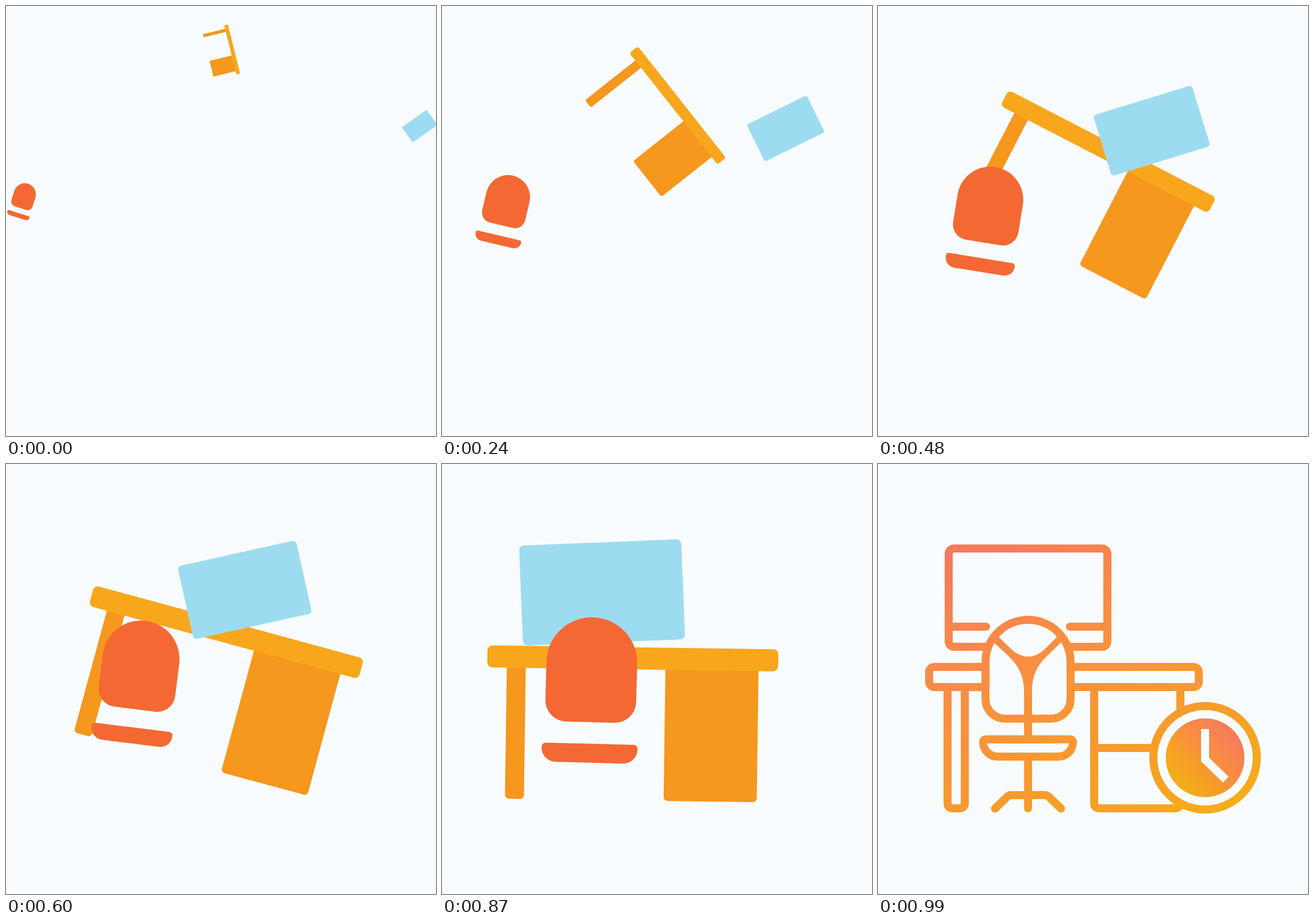
Write an HTML page that moves like this. It is 748 px wide and 748 px high and loops after 2890 ms.

```html
<!DOCTYPE html>
<html lang="en">
<head>
<meta charset="utf-8">
<title>Desk</title>
<style>
  html, body { margin: 0; width: 100%; height: 100%; overflow: hidden; background: #f8fcff; }
  svg { display: block; width: 100vw; height: 100vh; }
  .line { fill: none; stroke: url(#warm); stroke-width: 14; }
  .round { stroke-linecap: round; }
  .solid { fill: #f8fcff; }
  .hands { stroke: #f8fcff; }
</style>
</head>
<body>
<svg viewBox="0 0 748 748">
  <defs>
    <linearGradient id="warm" gradientUnits="userSpaceOnUse" x1="180" y1="100" x2="480" y2="680">
      <stop offset="0" stop-color="#f5785f"/>
      <stop offset=".36" stop-color="#fa8d44"/>
      <stop offset=".72" stop-color="#f79c2b"/>
      <stop offset="1" stop-color="#f5ae18"/>
    </linearGradient>
    <linearGradient id="dial" gradientUnits="userSpaceOnUse" x1="622" y1="462" x2="514" y2="562">
      <stop offset="0" stop-color="#f5795e"/>
      <stop offset=".4" stop-color="#f98d43"/>
      <stop offset=".7" stop-color="#f6a023"/>
      <stop offset="1" stop-color="#f2b117"/>
    </linearGradient>
  </defs>

  <g id="parts">
    <g id="desk">
      <g fill="#f6971e">
        <rect x="-219" y="-115" width="33" height="248.5" rx="7"/>
        <rect x="57" y="-115" width="162" height="248.5" rx="7"/>
      </g>
      <rect x="-253" y="-133" width="506" height="38.5" rx="9" fill="#f8a71d"/>
    </g>
    <rect id="screen" x="-149" y="-92" width="298" height="184" rx="9" fill="#9ddcf0"/>
    <g id="chair" fill="#f46933">
      <path d="M-79-47a79 79 0 0 1 158 0V19.500a37 37 0 0 1-37 37H-42a37 37 0 0 1-37-37z"/>
      <path d="M-75.500 94H75.500q8 0 8 8a25 25 0 0 1-25 25H-58.500a25 25 0 0 1-25-25q0-8 8-8z"/>
    </g>
  </g>

  <g id="icon" class="line">
    <rect x="123" y="147" width="276" height="171" rx="9"/>
    <path class="round" d="M125 283H188M334 283H397"/>
    <rect x="121" y="370" width="30" height="229" rx="8"/>
    <rect x="376" y="370" width="150" height="229" rx="8"/>
    <path d="M376 494H490"/>
    <rect class="solid" x="89" y="353" width="469" height="35" rx="9"/>
    <path class="solid" d="M187 345a74 74 0 0 1 148 0V409a34 34 0 0 1-34 34H221a34 34 0 0 1-34-34z"/>
    <path fill="url(#warm)" stroke="none" d="M200 304L210 301 235 325Q261 345 287 325L312 300 321 308 292 336C274 354 268 372 268 396V474H254V396C254 372 247 354 229 336L202 311z"/>
    <path d="M188 479H334q5 0 5 5a25 25 0 0 1-25 25H208a25 25 0 0 1-25-25q0-5 5-5z"/>
    <path class="round" d="M261 512V599M203.500 599.500L224 579.500Q227.500 576 232 576H290Q294.500 576 298 579.500L318.500 599.500"/>
    <circle class="solid" cx="569" cy="511" r="90"/>
    <circle cx="569" cy="511" r="68.500" fill="url(#dial)" stroke="none"/>
    <path class="hands" d="M569 461V514L605 549"/>
  </g>
</svg>
<script>
const LOOP = 2890, STEP = 30, REVEAL = 990;
const byId = id => document.getElementById(id);
const ramp = (t, from, to) => Math.min(1, Math.max(0, (t - from) / (to - from)));
const mix = (a, b, p) => a + (b - a) * p;
const show = (id, on) => byId(id).setAttribute("visibility", on ? "visible" : "hidden");

function place(id, x, y, scale, angle) {
  byId(id).setAttribute("transform", `translate(${x} ${y}) rotate(${angle}) scale(${scale})`);
}

// Grows while falling, drops onto its feet, then rocks back a little.
function moveDesk(t) {
  const grow = ramp(t, 0, 630), drop = ramp(t, 630, 750), rock = ramp(t, 750, 930);
  place("desk",
    374.2 - 20.5 * grow - 24.7 * drop + 2 * rock,
    80.4 + 333.5 * grow + 40.6 * drop - 4 * rock,
    mix(0.174, 1, grow),
    mix(76, 0, ramp(t, 0, 750)) + 1.2 * rock);
}

function moveScreen(t) {
  const p = ramp(t, 0, 930);
  place("screen", mix(719.5, 248, p), mix(209, 224.4, p), mix(0.177, 1, p), mix(-35.3, 0, p));
}

// Overshoots to the right, then slides back upright.
function moveChair(t) {
  const p = ramp(t, 0, 750), back = ramp(t, 750, 930);
  place("chair",
    mix(29.3, 280, p) - 31 * back,
    mix(338.5, 389, p) + 5.5 * back,
    mix(0.244, 1, p),
    mix(17.5, 4.5, p) - 4.5 * back);
}

function draw(now) {
  const t = Math.floor((now % LOOP) / STEP) * STEP;
  const done = t >= REVEAL;
  show("parts", !done);
  show("icon", done);
  moveDesk(t);
  moveScreen(t);
  moveChair(t);
}

function tick() {
  draw(performance.now());
  requestAnimationFrame(tick);
}
tick();
</script>
</body>
</html>
```
